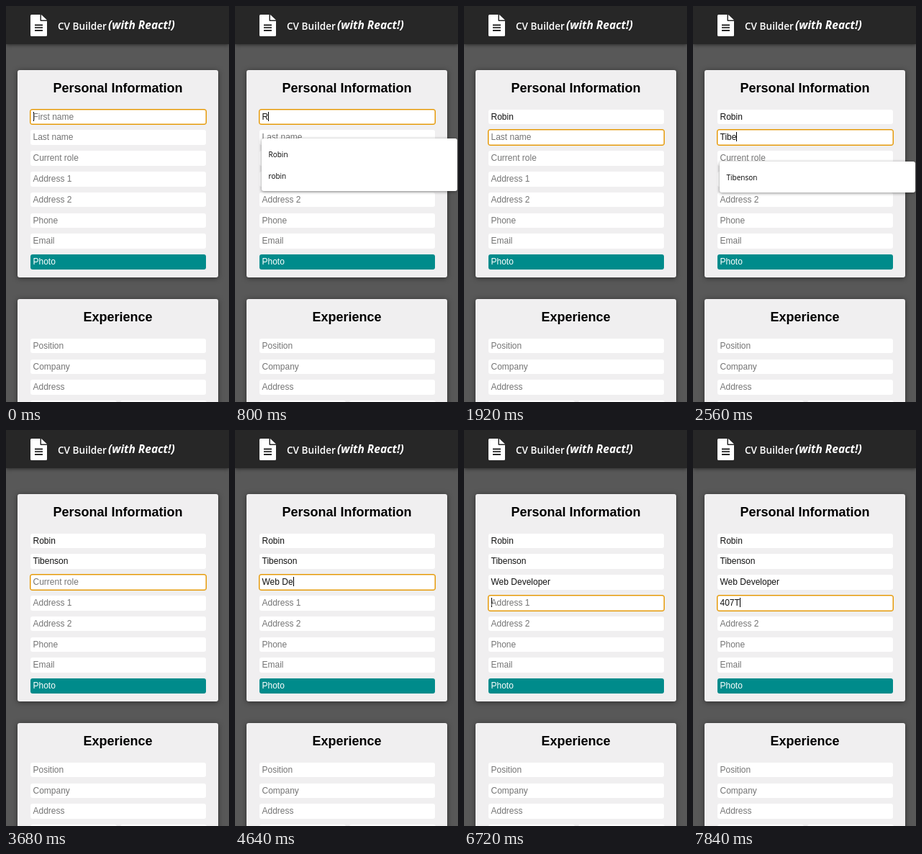
These frames come from a looping animation (310x550 px, 8 s). An HTML page:

```html
<!DOCTYPE html>
<html lang="en">
<head>
<meta charset="utf-8">
<title>CV Builder</title>
<style>
  html, body { margin: 0; width: 100%; height: 100%; overflow: hidden; }
  body { position: relative; background: #585858; font: 12px/21px "Liberation Sans", Arial, sans-serif; }
  header, header *, .card, .field, .menu { position: absolute; }
  header {
    left: 0; top: 0; width: 310px; height: 53px; background: #272727; color: #fff;
    font-family: "Open Sans", sans-serif; white-space: nowrap; box-shadow: 0 1px 5px rgba(0, 0, 0, .55);
  }
  header svg { left: 34px; top: 12px; }
  header b { left: 72px; top: 17px; font-size: 13.6px; font-weight: 600; }
  header em { left: 142px; top: 16px; font-size: 15.5px; font-weight: 700; }
  .card {
    left: 16px; width: 279px; height: 288px; border-radius: 3px;
    background: #f0eff0; box-shadow: 0 1px 7px rgba(0, 0, 0, .5);
  }
  h2 { margin: 14px 0 0; font-size: 18px; line-height: 22px; text-align: center; color: #000; }
  .field {
    left: 33.5px; width: 240.8px; height: 20.6px; padding-left: 4px; border-radius: 3px;
    background: #fff; color: #111; white-space: pre;
  }
  .half { width: 116.8px; }
  .hint { color: #757575; }
  .photo { background: #008b8b; color: #fff; }
  .focus { box-shadow: 0 0 0 1px #e59700, inset 0 0 0 .5px #e8a528; }
  .caret { display: none; width: 1px; height: 13px; margin-right: -1px; vertical-align: -2px; background: #000; }
  .focus .caret { display: inline-block; }
  .menu {
    left: 36.5px; width: 272.5px; padding: 7px 0 6px; border-radius: 3px; background: #fff; color: #000;
    box-shadow: 0 1px 4px rgba(0, 0, 0, .45); font: 500 10px/30px "Open Sans", sans-serif;
  }
  .menu div { padding-left: 10px; }
</style>
</head>
<body>
<header>
  <svg width="23" height="30" viewBox="0 0 23 30">
    <path fill="#fff" d="M1.5 0H13.5V8Q13.5 9 14.5 9H23V28.5Q23 30 21.5 30H1.5Q0 30 0 28.5V1.5Q0 0 1.5 0ZM15 0L23 7.5H15Z"/>
    <path stroke="#272727" stroke-width="1.8" d="M6 14.5H17M6 18.2H17M6 22H17"/>
  </svg>
  <b>CV Builder</b><em>(with React!)</em>
</header>
<script>
const LOOP = 8000, TICK = 160, BLINK = 320;
const PITCH = 28.8, TOP_A = 143.6, TOP_B = 461.8;

function add(cls, top, parent = document.body) {
  const el = document.createElement('div');
  el.className = cls;
  if (top !== undefined) el.style.top = top + 'px';
  parent.append(el);
  return el;
}

function span(cls, parent, text = '') {
  const el = document.createElement('span');
  el.className = cls;
  el.textContent = text;
  parent.append(el);
  return el;
}

function addCard(top, title) {
  const h = document.createElement('h2');
  h.textContent = title;
  add('card', top).append(h);
}

function addField(top, label, cls = '') {
  const box = add('field ' + cls, top);
  return {
    box,
    value: span('', box),
    caret: span('caret', box),
    hint: span(cls === 'photo' ? '' : 'hint', box, label),
  };
}

function addMenu(top, items) {
  const menu = add('menu', top);
  for (const item of items) add('', undefined, menu).textContent = item;
  return menu;
}

addCard(89, 'Personal Information');
addCard(407, 'Experience');

const fields = ['First name', 'Last name', 'Current role', 'Address 1', 'Address 2', 'Phone', 'Email']
  .map((label, i) => addField(TOP_A + i * PITCH, label));
addField(TOP_A + 7 * PITCH, 'Photo', 'photo');
['Position', 'Company', 'Address'].forEach((label, i) => addField(TOP_B + i * PITCH, label));
for (const left of [33.5, 158.5]) {
  addField(TOP_B + 3 * PITCH, '', 'half').box.style.left = left + 'px';
}

// focus: time the field is entered; start, step: key timing
const script = [
  { word: 'Robin', focus: 160, start: 640, step: 200, menu: addMenu(183.5, ['Robin', 'robin']) },
  { word: 'Tibenson', focus: 1600, start: 2200, step: 110, menu: addMenu(215.5, ['Tibenson']) },
  { word: 'Web Developer', focus: 3200, start: 3840, step: 159 },
  { word: '407T', focus: 6080, start: 7000, step: 220 },
];

function draw(t) {
  const active = Math.max(0, script.findLastIndex(s => t >= s.focus));
  script.forEach((s, i) => {
    const { box, value, caret, hint } = fields[i];
    const n = Math.max(0, Math.min(s.word.length, Math.floor((t - s.start) / s.step) + 1));
    const lastKey = n ? s.start + (n - 1) * s.step : s.focus;
    const on = i === active;
    const lit = t < lastKey || (t - lastKey) % (2 * BLINK) < BLINK;
    value.textContent = s.word.slice(0, n);
    hint.style.display = n ? 'none' : '';
    box.classList.toggle('focus', on);
    caret.style.visibility = lit ? 'visible' : 'hidden';
    if (s.menu) s.menu.style.display = on && n ? '' : 'none';
  });
}

function frame() {
  const t = performance.now() % LOOP;
  draw(Math.floor(t / TICK) * TICK);
  requestAnimationFrame(frame);
}
frame();
</script>
</body>
</html>
```
